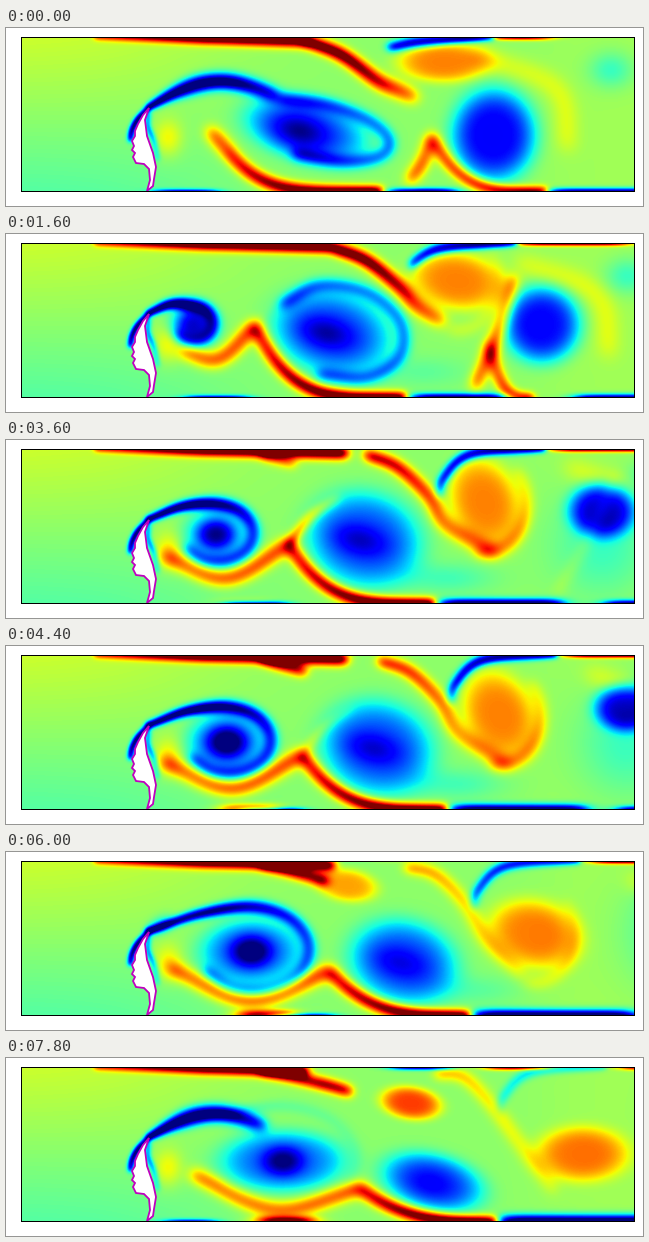
Write a matplotlib script that moves like this. It is 637 by 178 pixels and loops after 8 s.

```python
import numpy as np
import matplotlib.pyplot as plt
from matplotlib.animation import FuncAnimation

W, H, DPI = 637, 178, 100
LEFT, RIGHT, TOP, BOTTOM = 15, 628, 9, 163
STEPS, INTERVAL = 40, 200

xs = np.arange(LEFT, RIGHT) + .5
ys = np.arange(TOP, BOTTOM) + .5
X, Y = np.meshgrid(xs, ys)


def sigmoid(z):
    return .5 * (1 + np.tanh(z / 2))


def ramp(t, a, b):
    """Smooth step from 0 at a to 1 at b."""
    u = np.clip((t - a) / (b - a), 0, 1)
    return u * u * (3 - 2 * u)


def bend(t, start, mid, end):
    """Parabola through three values at t = 0, 1/2 and 1."""
    return (2 * (t - .5) * (t - 1) * start + 4 * t * (1 - t) * mid
            + 2 * t * (t - .5) * end)


def smooth(pts, count=90):
    """Cubic curve through a few points."""
    pts = np.asarray(pts, float)
    slope = np.gradient(pts, axis=0)
    q = np.linspace(0, len(pts) - 1, count)
    i = np.minimum(q.astype(int), len(pts) - 2)
    s = (q - i)[:, None]
    return ((1 + 2 * s) * (1 - s) ** 2 * pts[i] + s * (1 - s) ** 2 * slope[i]
            + s ** 2 * (3 - 2 * s) * pts[i + 1] + s ** 2 * (s - 1) * slope[i + 1])


def profile(vals, count):
    vals = np.atleast_1d(vals)
    return np.interp(np.linspace(0, 1, count), np.linspace(0, 1, len(vals)), vals)


def strand(pts, width, amp, gain=1):
    """Soft ribbon built from Gaussian dots along a curve."""
    p = smooth(pts)
    sig, a = profile(width, len(p)), profile(amp, len(p))
    ds = np.hypot(*np.gradient(p, axis=0).T)
    gx = np.exp(-((xs - p[:, :1]) / sig[:, None]) ** 2 / 2)
    gy = np.exp(-((ys[:, None] - p[:, 1]) / sig) ** 2 / 2)
    return (gy * (gain * a * ds / (sig * np.sqrt(2 * np.pi)))) @ gx


def blob(x, y, rx, ry, amp, angle=0, power=2):
    c, s = np.cos(np.radians(angle)), np.sin(np.radians(angle))
    dx, dy = X - x, Y - y
    r2 = ((dx * c + dy * s) / rx) ** 2 + ((dy * c - dx * s) / ry) ** 2
    return amp * np.exp(-r2 ** power)


def wall(y, x0, x1, amp, thick=3):
    span = sigmoid((xs - x0) / 6) - sigmoid((xs - x1) / 6)
    return amp * np.exp(-((ys[:, None] - y) / thick) ** 2) * span


def arc(x, y, rx, ry, a0, a1, tilt=0, shrink=1):
    """Points on an elliptic spiral, clockwise from angle a0 to a1."""
    a = np.radians(np.linspace(a0, a1, 7))
    k = np.linspace(1, shrink, 7)
    u, v = rx * k * np.cos(a), ry * k * np.sin(a)
    c, s = np.cos(np.radians(tilt)), np.sin(np.radians(tilt))
    return list(zip(x + u * c - v * s, y + u * s + v * c))


def leg(x0, y0, x1, steep):
    """Curve that slides from a crest down onto the bottom wall."""
    u = np.linspace(0, 1, 8) ** 1.5
    return list(zip(x0 + (x1 - x0) * u, 164 - (164 - y0) * (1 - u) ** steep))


def background():
    inlet = sigmoid((190 - X) / 50)
    depth = (Y - TOP) / (BOTTOM - TOP)
    return inlet * (.2 - .3 * depth) + (1 - inlet) * .04 + .05 * sigmoid((X - 540) / 20)


def head_layers():
    face = [(124, 113), (126, 102), (132, 91), (143, 79)]
    back = [(143, 85), (142, 98), (148, 113), (152, 132)]
    return (strand(face, 2.5, [-.7, -1, -1.1, -.8]) + strand(back, 2.5, [-.4, -.5, -.2])
            + blob(162, 110, 14, 18, .27, power=1))


def blue_vortices(t):
    # new vortex rolling up behind the head
    x, y = bend(t, 172, 214, 277), 87 + 16 * t
    born = ramp(t, .03, .18)
    v = blob(x, y, 20, 18 - 4 * t, born * (-1 + .5 * t), power=1.2)
    v += blob(x, y, 12 + 50 * t, bend(t, 12, 30, 30), -.58 * ramp(t, .3, .65))
    coil = arc(x, y, 8 + 70 * t, 10 + 45 * t, -90, 150, shrink=.85)
    middle = ((143 + x) / 2, (79 + coil[0][1]) / 2 - 5)
    v += strand([(143, 79), middle] + coil, [3, 5, 5.5, 5.5, 5],
                [-1.1, -1.25, -.9, -.6, -.55, -.5, -.4],
                born * (1 - .9 * ramp(t, .7, 1)))

    # dark layer stretching downstream before it rolls up
    for length, lift, gain in ((128 - 150 * t, 20, 1 - ramp(t, .02, .16)),
                               (20 + 95 * ramp(t, .75, 1), 18 * ramp(t, .82, 1),
                                ramp(t, .72, .85))):
        u = np.linspace(0, 1, 6)
        layer = zip(143 + length * u, 79 - 11 * u - lift * np.sin(np.pi * u))
        v += strand(list(layer), [3, 6, 6, 6], [-1.1, -1.3, -1.2, -.7], gain)

    # large vortex in mid channel with a fading ring
    x, y = 300 + 127 * t, bend(t, 102, 100, 124)
    v += blob(x, y, 62 - 10 * t, bend(t, 30, 47, 28), -.62, 14)
    v += blob(x - 6 + 4 * t, y + 1, 28, 16, -.4 + .2 * t, 14, power=1)
    ring = arc(x + 8, y, 78 - 60 * t, 28 + 90 * t, -120 - 200 * t, 100, 12)
    v += strand(ring, 5.5, -.48, 1 - ramp(t, .15, .42))

    # oldest vortex leaving on the right
    x, y = 488 + 235 * t, 107 - 80 * t
    v += blob(x, y, 42 - 18 * t, 46 - 40 * t, -.82)
    v += blob(x, y + 35, 50, 55, -.25 * ramp(t, .2, .45), power=1)
    v += blob(605 + 80 * t, 42, 22, 18, -.25, power=1)
    v += blob(400 + 90 * t, 138, 45, 15, -.18 * np.sin(np.pi * t), power=1)
    return v


def top_layers(t):
    swing = np.sin(np.pi * t) ** 2
    v = strand([(90, 8), (195, 10), (300 + 40 * np.sin(np.pi * t), 13)],
               [3, 4.5, 5], [.6, 1.15, 1.15])
    hx, hy = 240 + 105 * t, 14 + 20 * t
    v += strand([(255, 12), (hx - 28, hy - 8), (hx, hy)], 5, [.6, .9, .8],
                ramp(t, .3, .6))

    # orange vortex and the red streamer that feeds it
    x, y = bend(t, 438, 484, 576), 34 + 62 * t
    v += blob(x, y, 46, bend(t, 20, 34, 27), .5, 70 * swing ** 2)
    start = np.array([300 + 130 * t, 13 + 3 * t])
    mid = np.array([372 + 112 * t, 53 + 8 * swing - 8 * t])
    end = np.array([x - 28 + 38 * swing, y + 36 + 14 * swing])
    shoulder = (start + mid) / 2 - [0, 6 + 6 * t]
    hip = (mid + end) / 2 - [16 * swing, 0]
    v += strand([start, shoulder, mid, hip, end], [5, 5.5, 6, 6.5, 6.5],
                [1.15, 1.1, .85, .65, .45], 1 - .7 * ramp(t, .15, .9))
    v += strand(arc(x, y, 42, 50, 100, -40), 6, [.35, .3, .15], swing)

    # next orange vortex budding from the layer
    v += blob(405 - 275 * (1 - t), 45 - 50 * (1 - t), 30, 16,
              .65 * ramp(t, .6, .88), 8)

    # blue sheet lifted off the wall
    x, y = 382 + 112 * t, 18 + 38 * ramp(t, 0, .45)
    v += strand([(x, y), (x + 4, (y + 20) / 2), (x + 32, 14), (x + 105, 8)],
                [4, 4, 4, 3], [-.3, -.8, -1, -1.1], 1 - .65 * ramp(t, .6, 1))

    x, late = 488 + 130 * t, ramp(t, .75, .9)
    v += wall(9, x, x + 55 + 250 * t, 1)
    v += wall(9, 482 - 500 * (1 - t), 540 - 500 * (1 - t), late)
    v += wall(9, 386 - 340 * (1 - t), 445 - 340 * (1 - t), -late)
    return v


def bottom_layers(t):
    # red layer: foot, sag, crest, then down to the wall
    x, y = 222 + 132 * t, 82 + 48 * t + 41 * (1 - ramp(t, 0, .2))
    foot = (bend(t, 203, 158, 187), 102 + 14 * ramp(t, 0, .2))
    sag = ((foot[0] + x) / 2, bend(t, 112, 140, 152))
    v = strand([foot, sag, (x, y)], 6.5, [.5, .58, .62])
    v += strand(leg(x, y, 375 + 115 * t, 4.8 - 1.8 * t), [6, 5.5, 5, 4.5],
                [.65, .9, 1.15, 1.3])
    v += strand([(x, y), (x + 22, y - 28), (x + 50, y - 47)], 4.5, [.5, .4, .15],
                ramp(t, .18, .32) * (1 - ramp(t, .45, .65)))

    # older crest stretched into a thin orange fork
    foot = np.array([403 + 320 * t, 153])
    tip = np.array([426 + 400 * t, 108 - 56 * ramp(t, 0, .2) - 40 * t])
    v += strand([foot, (foot + tip) / 2 + [2, 4], tip], 6, [.5, .55, .4],
                1 - ramp(t, .2, .55))
    v += strand(leg(426 + 280 * t, 110, 540 - 65 * t, 3.8), [6, 5, 4],
                [.5, .8, 1.1], 1 - ramp(t, .1, .45))
    shift = 200 * t
    v += strand([(470 + shift, 27), (550 + shift, 60), (562 + shift, 120)], 9, .16)

    x = 150 + 150 * t
    v += wall(164, x, x + 62, -.85 * (1 - ramp(t, .85, 1)))
    v += wall(164, 160, 210, -.8 * ramp(t, .8, .95))
    v += wall(163, 170 + 83 * t, 225 + 83 * t, ramp(t, .4, .65), 5)
    v += wall(164, 385 + 110 * t, 450 + 230 * t, -1.1 - .3 * t, 4 + 3 * t)
    v += wall(164, 545 + 120 * t, 670, -1.1, 4)
    return v


base = background() + head_layers()


def field(step):
    t = step / (STEPS - 1)
    return np.clip(base + blue_vortices(t) + top_layers(t) + bottom_layers(t), -1, 1)


fig = plt.figure(figsize=(W / DPI, H / DPI), dpi=DPI, facecolor="white")
ax = fig.add_axes([LEFT / W, 1 - BOTTOM / H, (RIGHT - LEFT) / W, (BOTTOM - TOP) / H])
image = ax.imshow(field(0), cmap="jet", vmin=-1, vmax=1, aspect="auto",
                  extent=(LEFT, RIGHT, BOTTOM, TOP), interpolation="nearest")
head = [(143, 80), (137, 87), (132, 96), (129, 103), (129, 108), (126, 113),
        (128, 118), (126, 122), (129, 125), (127, 129), (130, 135), (138, 136),
        (143, 141), (144, 152), (141, 163), (147, 158), (148, 151), (150, 139),
        (147, 125), (141, 108), (139, 92), (143, 80)]
ax.fill(*zip(*head), facecolor="white", edgecolor="m", linewidth=1.3)
ax.set(xlim=(LEFT, RIGHT), ylim=(BOTTOM, TOP), xticks=[], yticks=[])
for spine in ax.spines.values():
    spine.set_linewidth(.72)


def update(step):
    image.set_data(field(step))
    return [image]


anim = FuncAnimation(fig, update, frames=STEPS, interval=INTERVAL,
                     repeat=True, repeat_delay=0)
plt.show()
```
